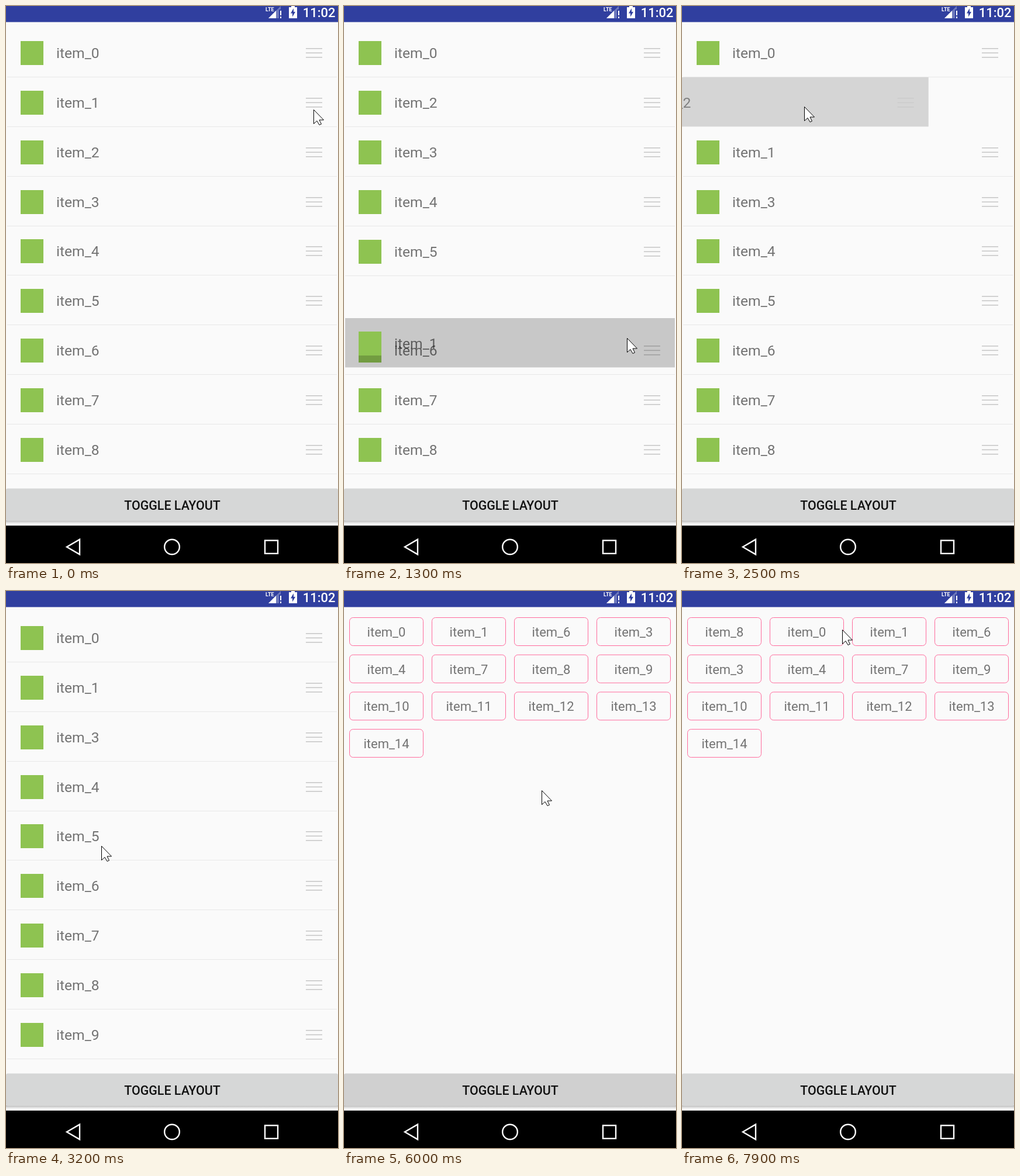
Recreate the animation shown at these times as an HTML page with a canvas. Size 568x953 px, loop 8000 ms.

```html
<!DOCTYPE html>
<html lang="en">
<head>
<meta charset="utf-8">
<title>Reorderable list</title>
<style>
html, body { margin: 0; width: 568px; height: 953px; overflow: hidden; background: #fafafa; }
canvas { display: block; }
</style>
</head>
<body>
<canvas id="stage" width="568" height="953"></canvas>
<script>
const ctx = document.getElementById('stage').getContext('2d');
const WIDTH = 568, LOOP = 8000, STEP = 100;
const MOVE = 250, FLY = 150, REMOVE_DELAY = 120, LAG = 50, SLOP = 8;
const PRESS_AT = 5600, GRID_AT = 5700, RELEASE_AT = 6100;
const TEXT = 'rgba(0,0,0,.54)', SHADE = 'rgba(0,0,0,.2)';

// Where the pointer rests or turns: [time, x, y]
const hand = [
  [400, 526, 177], [1230, 486, 591], [1650, 462, 249], [1700, 459, 239], [2000, 457, 262],
  [2300, 430, 165], [2620, 110, 175], [3200, 163, 436],
  [3400, 163, 436], [3680, 470, 400], [4050, 505, 327],
  [4700, 534, 421], [4800, 534, 421], [5100, 525, 235], [5250, 525, 240],
  [5600, 395, 867], [6000, 338, 341],
  [6400, 354, 134], [6800, 354, 134], [7200, 64, 75], [7400, 64, 75], [7900, 274, 66]
];

// Items held by the pointer; lock scales its movement per axis
const holds = [
  { item: 1, from: 400, to: 2000, lock: [0, 1] },
  { item: 2, from: 2300, to: 2620, lock: [1, 0], swipe: true },
  { item: 5, from: 3400, to: 3680, lock: [1, 0], swipe: true },
  { item: 6, from: 4700, to: 5250, lock: [0, 1] },
  { item: 8, from: 6500, to: 7400, lock: [1, 1] }
];

const clamp = (v, min, max) => Math.min(max, Math.max(min, v));
const ease = p => (1 - Math.cos(Math.PI * clamp(p, 0, 1))) / 2;
const mix = (a, b, p) => a.map((v, i) => v + (b[i] - v) * p);

function handAt(t) {
  const next = hand.findIndex(k => k[0] > t);
  if (next < 1) return (next ? hand.at(-1) : hand[0]).slice(1);
  const [t0, ...a] = hand[next - 1], [t1, ...b] = hand[next];
  return mix(a, b, ease((t - t0) / (t1 - t0)));
}

const isGrid = t => t >= GRID_AT;
const listSlot = i => [0, 37.05 + 84.85 * i];
const gridSlot = i => [9.5 + 141 * (i % 4), 45.5 + 63.7 * Math.floor(i / 4)];
const slotAt = (i, t) => isGrid(t) ? gridSlot(i) : listSlot(i);

function dragged({ from, to, lock, home }, t) {
  const a = handAt(from), b = handAt(clamp(t - LAG, from, to));
  return slotAt(home, from).map((v, k) => v + (b[k] - a[k]) * lock[k]);
}

// Grid: the nearest cell. List: the last row whose top edge was passed.
function dropIndex([x, y], i, count, t) {
  if (isGrid(t)) {
    const far = n => Math.hypot(gridSlot(n)[0] - x, gridSlot(n)[1] - y);
    return [...Array(count).keys()].reduce((a, b) => far(b) < far(a) ? b : a);
  }
  while (y > listSlot(i + 1)[1] + SLOP) i++;
  while (y < listSlot(i - 1)[1] - SLOP) i--;
  return i;
}

// Play the gestures once to learn when the order changes
const items = [...Array(15).keys()];
const orders = [{ time: -LOOP, order: items }];
for (let t = 0; t < LOOP; t += 5) {
  for (const hold of holds) {
    const { order } = orders.at(-1), i = order.indexOf(hold.item);
    const rest = order.filter(n => n !== hold.item);
    if (t === hold.from) hold.home = i;
    if (hold.swipe) {
      if (t === hold.to + FLY + REMOVE_DELAY) orders.push({ time: t, order: rest });
    } else if (t > hold.from && t <= hold.to) {
      const j = dropIndex(dragged(hold, t), i, order.length, t);
      if (j !== i) orders.push({ time: t, order: rest.toSpliced(j, 0, hold.item) });
    }
  }
}

function place(item, t) {
  let pos = slotAt(item, t);
  for (const { time, order } of orders) {
    const i = order.indexOf(item);
    if (time > t || i < 0) break;
    pos = mix(pos, slotAt(i, t), ease((t - time) / MOVE));
  }
  return pos;
}

// Held position, then flying out or settling into the slot
function heldPlace(hold, t) {
  const pos = dragged(hold, t);
  if (t <= hold.to) return pos;
  return hold.swipe
    ? mix(pos, [Math.sign(pos[0]) * WIDTH, pos[1]], ease((t - hold.to) / FLY))
    : mix(pos, place(hold.item, t), ease((t - hold.to) / MOVE));
}

function rect(color, x, y, w, h) {
  ctx.fillStyle = color;
  ctx.fillRect(x, y, w, h);
}

function poly(points, fill, stroke, width = 1) {
  ctx.beginPath();
  points.forEach(([x, y]) => ctx.lineTo(x, y));
  ctx.closePath();
  if (fill) { ctx.fillStyle = fill; ctx.fill(); }
  if (stroke) { ctx.strokeStyle = stroke; ctx.lineWidth = width; ctx.stroke(); }
}

function label(str, x, y, size, color, align = 'left', weight = 400) {
  ctx.font = `${weight} ${size}px Roboto, sans-serif`;
  ctx.textAlign = align;
  ctx.fillStyle = color;
  ctx.fillText(str, x, y);
}

function drawRow(item, [x, y], held) {
  y = Math.round(y);
  if (held) rect(SHADE, x + 2, y, WIDTH - 4, 84);
  rect('#8ec351', x + 25, y + 23, 39, 41);
  label('item_' + item, x + 86, y + 52, 24.6, TEXT);
  for (let i = 0; i < 3; i++) rect('#c8c8c8', x + 513, y + 35 + 7.5 * i, 28, 1.6);
  rect('#e8e8e8', x + 2, y + 84, WIDTH - 4, 1);
}

function drawCell(item, [x, y], held) {
  ctx.beginPath();
  ctx.roundRect(x, y, 126, 48, 6);
  if (held) { ctx.fillStyle = SHADE; ctx.fill(); }
  ctx.strokeStyle = '#ff6a9c';
  ctx.lineWidth = 1;
  ctx.stroke();
  label('item_' + item, x + 63, y + 32.5, 22, TEXT, 'center');
}

function drawItems(t) {
  const draw = isGrid(t) ? drawCell : drawRow;
  const end = h => h.to + (h.swipe ? FLY : MOVE);
  const hold = holds.find(h => t >= h.from && t < end(h));
  const gone = holds.filter(h => h.swipe && t >= end(h)).map(h => h.item);
  ctx.save();
  ctx.beginPath();
  ctx.rect(0, 27, WIDTH, 790);
  ctx.clip();
  for (const item of items)
    if (item !== hold?.item && !gone.includes(item)) draw(item, place(item, t));
  if (hold) {
    const pos = heldPlace(hold, t);
    if (hold.swipe) ctx.globalAlpha = 1 - Math.abs(pos[0]) / WIDTH;
    draw(hold.item, pos, true);
  }
  ctx.restore();
}

function drawStatusBar() {
  rect('#303f9f', 0, 0, WIDTH, 27.5);
  label('LTE', 444, 8.5, 9, '#fff', 'left', 700);
  poly([[449, 21], [470, 0], [470, 6], [467, 6], [467, 21]], 'rgba(255,255,255,.3)');
  poly([[449, 21], [462, 8], [462, 21]], '#fff');
  rect('#fff', 469, 8, 2, 8);
  rect('#fff', 469, 18, 2, 3);
  rect('#fff', 488, 0, 6, 3);
  rect('#fff', 484, 2, 14, 19);
  poly([[492, 4], [487, 12.5], [490, 12.5], [490, 18.5], [495, 10], [492, 10]], '#303f9f');
  label('11:02', 563.5, 19, 22, '#fff', 'right', 500);
}

function drawButton(pressed) {
  const shadow = ctx.createLinearGradient(0, 880, 0, 886);
  shadow.addColorStop(0, '#b4b4b4');
  shadow.addColorStop(1, '#fafafa');
  rect(shadow, 0, 880, WIDTH, 6);
  ctx.fillStyle = pressed ? '#d0d0d0' : '#d6d7d7';
  ctx.beginPath();
  ctx.roundRect(0, 825.5, WIDTH, 55.5, 3);
  ctx.fill();
  label('TOGGLE LAYOUT', WIDTH / 2 + .5, 861.5, 21.4, '#111', 'center', 500);
}

function drawNavBar() {
  rect('#000', 0, 889, WIDTH, 64);
  poly([[104, 925.5], [126, 912.7], [126, 938.3]], null, '#fff', 2.4);
  ctx.beginPath();
  ctx.arc(284, 925.5, 12.8, 0, Math.PI * 2);
  ctx.stroke();
  ctx.strokeRect(443, 914.4, 22, 22.4);
}

function drawCursor([x, y]) {
  ctx.save();
  ctx.translate(Math.round(x) + .5, Math.round(y) + .5);
  poly([[0, 0], [0, 24], [5.5, 19], [9.5, 26], [13, 24.5], [9.5, 17.5], [17, 17.5]], '#fff', '#000');
  ctx.restore();
}

function render(now) {
  const t = Math.floor(now % LOOP / STEP) * STEP;
  rect('#fafafa', 0, 0, WIDTH, 953);
  drawItems(t);
  drawStatusBar();
  drawButton(t >= PRESS_AT && t < RELEASE_AT);
  drawNavBar();
  drawCursor(handAt(t));
}

const start = performance.now();
function frame() {
  render(performance.now() - start);
  requestAnimationFrame(frame);
}
frame();
</script>
</body>
</html>
```
